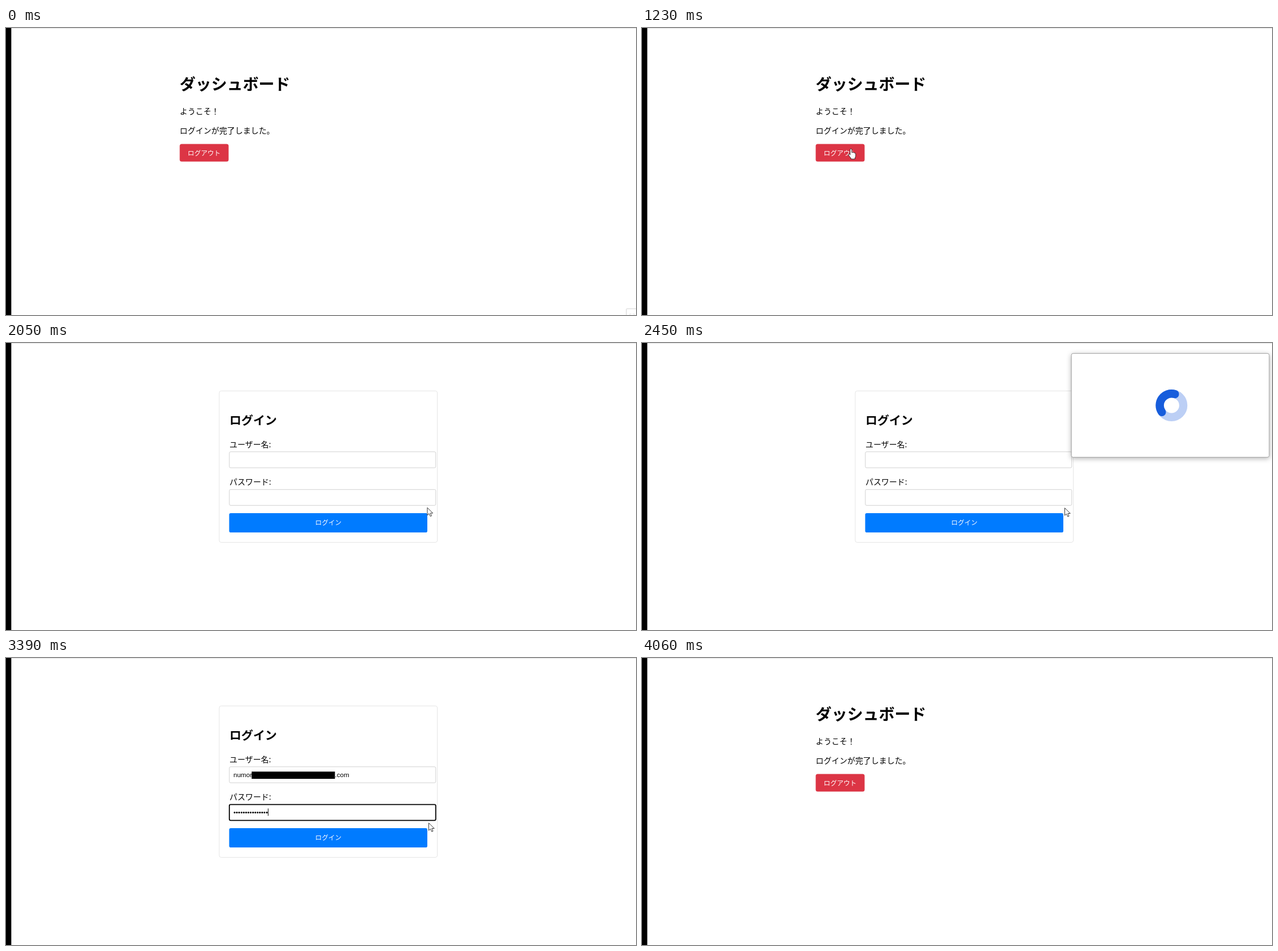
These frames come from a looping animation (1108 px wide and 506 px high, 4740 ms). An HTML page:

```html
<!DOCTYPE html>
<html lang="ja">
<head>
<meta charset="utf-8">
<title>ログイン</title>
<style>
  html, body { margin: 0; width: 100%; height: 100%; overflow: hidden; background: #fff; }
  svg { display: block; width: 100%; height: 100%; }
  text { font: 13.9px "Noto Sans CJK JP", "Noto Sans CJK", sans-serif; fill: #000; }
  .h1 { font-size: 27.78px; font-weight: 700; }
  .h2 { font-size: 20.83px; font-weight: 700; }
  .btn { font-size: 11.57px; fill: #fff; text-anchor: middle; }
  .value { font: 11.57px "Liberation Sans", Arial, sans-serif; }
  .field { fill: #fff; stroke: #ccc; stroke-width: .9; }
  .field.focus { stroke: #000; stroke-width: 1.8; }
  #popup > rect { filter: drop-shadow(0 2px 4px rgba(0, 0, 0, .3)); }
  #cursor path { fill: #fff; stroke: #222; stroke-width: .9; stroke-linejoin: round; }
</style>
</head>
<body>
<svg viewBox="0 0 1108 506">
  <rect width="1108" height="506" fill="#fff"/>
  <rect width="1108" height="1" fill="#e2e2e2"/>
  <rect width="9.3" height="506" fill="#000"/>

  <g id="dashboard">
    <text class="h1" x="305.5" y="109">ダッシュボード</text>
    <text x="305.5" y="152">ようこそ！</text>
    <text x="305.5" y="186.4">ログインが完了しました。</text>
    <rect x="305.5" y="204.5" width="86" height="31" rx="3.5" fill="#dc3545"/>
    <text class="btn" x="348.5" y="224.7">ログアウト</text>
  </g>

  <g id="login">
    <rect x="375" y="84.5" width="383.6" height="267" rx="3.5" fill="#fff" stroke="#e2e2e2" stroke-width=".9"/>
    <text class="h2" x="393" y="144.2">ログイン</text>
    <text x="393" y="183.6">ユーザー名:</text>
    <rect class="field" x="392.8" y="191.8" width="363" height="28.2" rx="2.2"/>
    <text x="393" y="249.8">パスワード:</text>
    <rect class="field" id="password" x="392.8" y="258.3" width="363" height="28" rx="2.2"/>
    <rect x="392.5" y="300" width="348.5" height="34" rx="2.8" fill="#007bff"/>
    <text class="btn" x="567" y="321.4">ログイン</text>
    <g id="filled">
      <text class="value" x="400" y="210">numor</text>
      <rect x="432" y="200.3" width="146.5" height="12.7"/>
      <text class="value" x="578.5" y="210">.com</text>
      <text class="value" id="dots" x="400" y="275.8"></text>
      <rect x="460.6" y="265.3" width="1" height="13"/>
    </g>
  </g>

  <g id="popup">
    <rect x="755.2" y="18.4" width="347.8" height="183" rx="3" fill="#fff" stroke="#999" stroke-width=".9"/>
    <g transform="translate(931.3 110)" fill="none" stroke-width="14.4">
      <circle r="20.7" stroke="#bccff5"/>
      <path id="arc" stroke="#175ddc" stroke-linecap="round"/>
    </g>
  </g>

  <g id="corner" fill="none" stroke="#e6e6e6">
    <path d="M1091 506V496.500Q1091 494.800 1093 494.800H1108" stroke-width="1.800"/>
    <path d="M1097 506V504H1100M1102 504H1105V506"/>
  </g>

  <g id="cursor">
    <path id="arrow" d="M.5 .3V13.500L3.600 10.800L5.800 15.600L8 14.700L5.900 10H10.200Z"/>
    <path id="hand" d="M-2 11V2Q-2 .5-.5 .5T1 2V7Q2 6 3.300 7Q4.600 6.500 5.600 7.800Q7.500 7.500 7.800 9.500V13Q7.800 15 6.500 16.500V18.500H-.5V17Q-3 14.500-4.800 11.200Q-5 9.200-3.400 9.600Z"/>
  </g>
</svg>
<script>
const LOOP = 4740, TICK = 68;
const $ = id => document.getElementById(id);
const show = (id, on) => $(id).setAttribute('display', on ? 'inline' : 'none');
const within = (t, a, b) => t >= a && t < b;

// Pointer path: time, x, y
const path = [
  [70, 1095, 489], [530, 633, 287], [670, 516, 229.500], [810, 428, 196],
  [880, 405, 191], [1020, 384, 203], [1090, 380, 209], [1230, 368, 212.500],
  [1489, 368, 212.500], [1490, 366, 206], [1560, 363.500, 203], [1839, 363.500, 203],
  [1840, 398, 211], [2050, 740.500, 290], [2120, 743, 290.500], [3719, 743, 290.500],
  [3720, 770, 308], [3990, 1023, 490], [4060, 1040, 506]
];

// Moves in even ticks between neighbouring path points
function pointer(t) {
  let i = 0;
  while (i < path.length - 2 && t >= path[i + 1][0]) i++;
  const [t0, x0, y0] = path[i], [t1, x1, y1] = path[i + 1];
  const n = Math.max(1, Math.round((t1 - t0) / TICK));
  const f = Math.floor((t - t0) / (t1 - t0) * n + 1e-6) / n;
  return [x0 + (x1 - x0) * f, y0 + (y1 - y0) * f];
}

function render(t) {
  const login = within(t, 1840, 3470);
  const filled = within(t, 3390, 3470);
  const popup = within(t, 2180, 2720);
  const moving = within(t, 70, 4060);
  const hand = within(t, 1050, 1840);
  show('dashboard', !login);
  show('login', login);
  show('filled', filled);
  show('popup', popup);
  show('corner', t < 70);
  show('cursor', moving);
  show('arrow', !hand);
  show('hand', hand);
  $('password').classList.toggle('focus', filled);
  if (popup) {
    const spin = Math.floor((t - 2450) / TICK) * TICK * .36;
    $('arc').setAttribute('transform', `rotate(${spin})`);
  }
  if (moving) $('cursor').setAttribute('transform', `translate(${pointer(t)})`);
}

const polar = (r, deg) => [r * Math.cos(deg * Math.PI / 180), r * Math.sin(deg * Math.PI / 180)];
$('arc').setAttribute('d', `M${polar(20.7, 145)}A20.7 20.7 0 0 1 ${polar(20.7, 287)}`);
$('dots').textContent = '•'.repeat(15);

const start = performance.now();
function frame() {
  render((performance.now() - start) % LOOP);
  requestAnimationFrame(frame);
}
frame();
</script>
</body>
</html>
```
